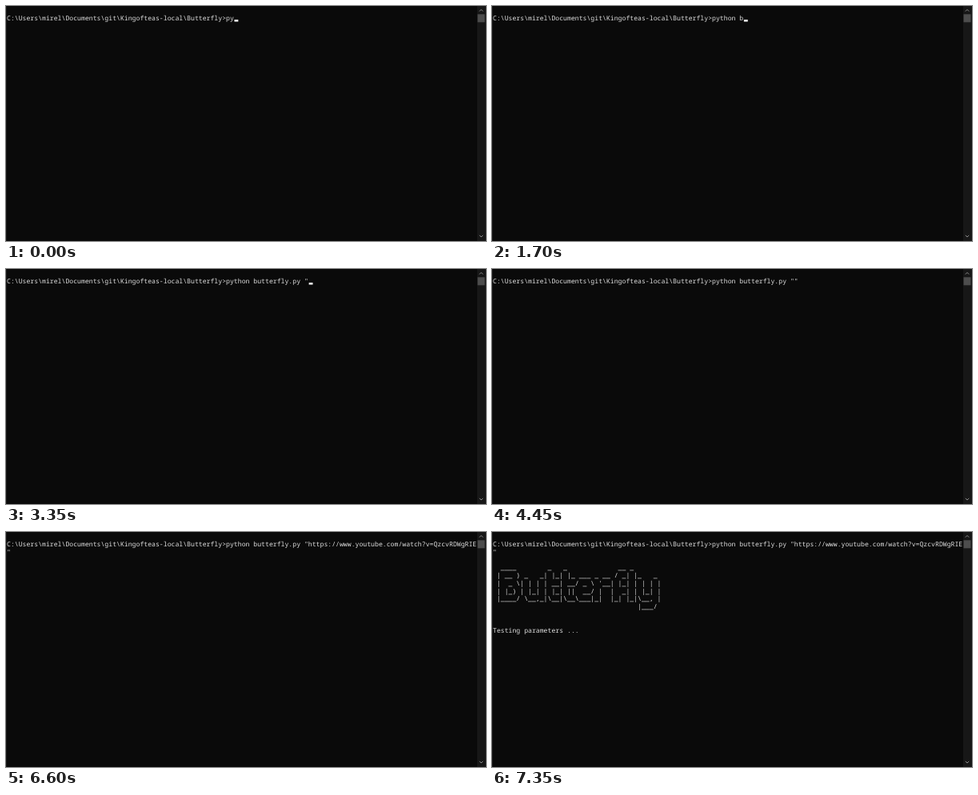
Recreate the animation shown at these times as an HTML page. Size 600 by 294 pixels, loop 8000 ms.

```html
<!DOCTYPE html>
<html lang="en">
<head>
<meta charset="utf-8">
<title>Terminal session</title>
<style>
  html, body { margin: 0; width: 100%; height: 100%; overflow: hidden; background: #0a0a0a; }
  svg { display: block; width: 100vw; height: 100vh; }
  text {
    font: 8.174px "Noto Sans Mono", "DejaVu Sans Mono", monospace;
    font-variant-ligatures: none;
    text-rendering: geometricPrecision;
    fill: #dedede;
  }
  .track { fill: #171717; }
  .thumb { fill: #4d4d4d; }
  .arrow { fill: none; stroke: #8c8c8c; stroke-width: 1; }
  .edge { fill: #191919; }
  #cursor { fill: #f2f2f2; }
</style>
</head>
<body>
<svg viewBox="0 0 600 294">
  <rect class="edge" width="1" height="294"/>
  <g id="screen"></g>
  <rect id="cursor" width="4.9" height="2.5"/>
  <rect class="track" x="589" width="11" height="294"/>
  <rect class="thumb" x="589.5" y="10.3" width="9" height="10"/>
  <path class="arrow" d="M591.8 6.6 594 4.4 596.2 6.6M591.8 286.8 594 289 596.2 286.8"/>
</svg>
<script>
const LOOP = 8000, COLS = 120, CELL_W = 4.904, CELL_H = 9.787, LEFT = 1;

const prompt = 'C:\\Users\\mirel\\Documents\\git\\Kingofteas-local\\Butterfly>';
const script = 'python butterfly.py';
const command = script + ' "https://www.youtube.com/watch?v=QzcvRDWgRIE"';
const banner = String.raw`
 ____        _   _             __ _
| __ ) _   _| |_| |_ ___ _ __ / _| |_   _
|  _ \| | | | __| __/ _ \ '__| |_| | | | |
| |_) | |_| | |_| ||  __/ |  |  _| | |_| |
|____/ \__,_|\__|\__\___|_|  |_| |_|\__, |
                                    |___/`.split('\n').slice(1);

// [start ms, typed text, cursor offset from the end of the text]
const HIDDEN = null, NEXT_LINE = COLS - 1;
const steps = [
  [0, 'py', 0],
  [200, 'pyt', 0],
  [300, 'pyth', 0],
  [800, 'pyth', HIDDEN],
  [950, 'pytho', 0],
  [1050, 'python', 0],
  [1300, 'python ', 0],
  [1700, 'python b', 0],
  [1800, 'python b', HIDDEN],
  [2000, 'python bu', 0],
  [2200, script, 0],
  [2850, script, HIDDEN],
  [3350, script + ' "', 0],
  [3400, script + ' ""', 0],
  [3950, script + ' ""', HIDDEN],
  [4200, script + ' ""', -1],
  [4450, script + ' ""', HIDDEN],
  [4800, command, -1],
  [5000, command, HIDDEN],
  [5500, command, -1],
  [6050, command, HIDDEN],
  [6200, command, NEXT_LINE],
  [6600, command, HIDDEN]
];
const BANNER_AT = 6850, TESTING_AT = 7350;

const screen = document.getElementById('screen');
const cursor = document.getElementById('cursor');

function addLine(row, content = '') {
  const line = document.createElementNS('http://www.w3.org/2000/svg', 'text');
  line.setAttribute('x', LEFT);
  line.setAttribute('y', row * CELL_H + 8.2);
  setText(line, content);
  return screen.appendChild(line);
}

function setText(line, content) {
  line.textContent = content.replace(/ /g, '\u00a0');
}

function show(element, visible) {
  element.style.visibility = visible ? 'visible' : 'hidden';
}

const inputLines = [addLine(1), addLine(2)];
const bannerLines = banner.map((content, i) => addLine(4 + i, ' ' + content));
const testingLine = addLine(12, 'Testing parameters ...');
let current;

function render(now) {
  const time = now % LOOP;
  const step = steps.findLast(([start]) => start <= time);

  if (step !== current) {
    current = step;
    const [, typed, offset] = step;
    const input = prompt + typed;
    inputLines.forEach((line, i) => setText(line, input.slice(i * COLS, (i + 1) * COLS)));

    show(cursor, offset !== HIDDEN);
    const cell = input.length + offset;
    cursor.setAttribute('x', LEFT + cell % COLS * CELL_W);
    cursor.setAttribute('y', (2 + Math.floor(cell / COLS)) * CELL_H - 2.5);
  }

  bannerLines.forEach(line => show(line, time >= BANNER_AT));
  show(testingLine, time >= TESTING_AT);
}

const origin = performance.now();
function tick() {
  render(performance.now() - origin);
  requestAnimationFrame(tick);
}
tick();
</script>
</body>
</html>
```
